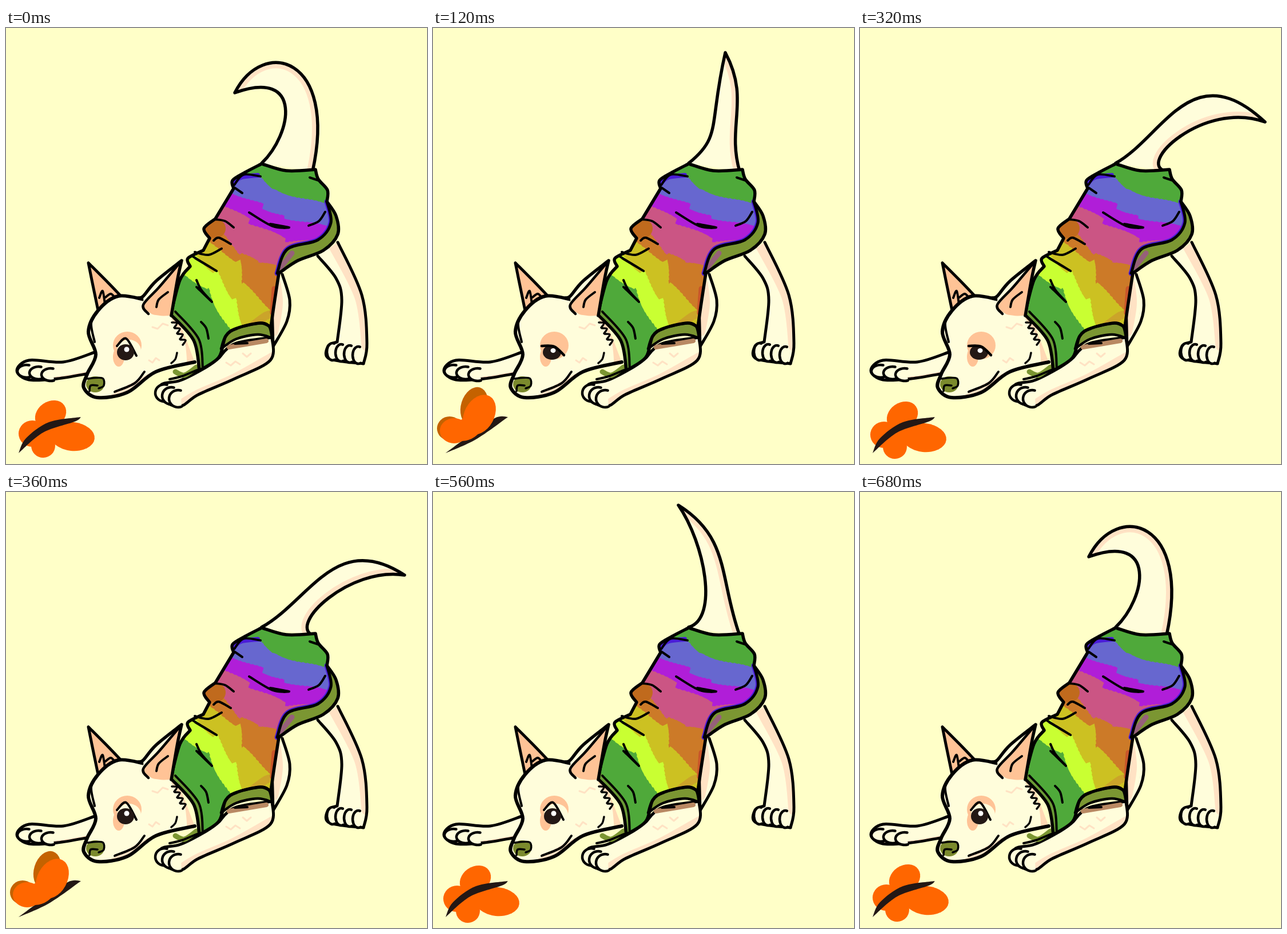
An HTML page with a canvas for the animation above (0.72 s loop, 736 by 761 pixels).

```html
<!DOCTYPE html>
<html lang="en">
<head>
<meta charset="utf-8">
<title>Playful puppy</title>
<style>
html, body { margin: 0; width: 100%; height: 100%; overflow: hidden; background: #ffffc8; }
canvas { display: block; }
</style>
</head>
<body>
<canvas id="stage" width="736" height="761"></canvas>
<script>
const ctx = document.getElementById('stage').getContext('2d');
const STEP = 40, STEPS = 18;
const CREAM = '#fffddb', PEACH = '#ffe2c4', SKIN = '#ffc396', GREEN = '#4fa93a', OLIVE = '#7b9632';
const ORANGE = '#ff6600', DARK = '#231815';

const points = s => s.trim().split(/\s+/).map(p => p.split(',').map(Number));

// Smooth curve through key points; "|" marks a corner
function shape(text) {
  const path = new Path2D();
  let last = null;
  for (const part of text.split('|')) {
    const p = last ? [last, ...points(part)] : points(part);
    if (!last) path.moveTo(...p[0]);
    for (let i = 0; i < p.length - 1; i++) {
      const a = p[i - 1] || p[i], b = p[i], c = p[i + 1], d = p[i + 2] || c;
      path.bezierCurveTo(
        b[0] + (c[0] - a[0]) / 6, b[1] + (c[1] - a[1]) / 6,
        c[0] - (d[0] - b[0]) / 6, c[1] - (d[1] - b[1]) / 6, c[0], c[1]);
    }
    last = p[p.length - 1];
  }
  return path;
}

const toPath = s => typeof s === 'string' ? shape(s) : s;

function fill(s, color) {
  ctx.fillStyle = color;
  ctx.fill(toPath(s));
}

function ink(s, width = 5, color = '#000') {
  ctx.lineWidth = width;
  ctx.strokeStyle = color;
  ctx.stroke(toPath(s));
}

function inside(path, paint) {
  ctx.save();
  ctx.clip(path);
  paint();
  ctx.restore();
}

// Filled outline with a soft shadow along one edge
function limb(outline, shade, size) {
  const path = shape(outline);
  fill(path, CREAM);
  inside(path, () => ink(shade, size, PEACH));
  ink(path);
}

function oval(x, y, rx, ry, color, turn = 0) {
  ctx.fillStyle = color;
  ctx.beginPath();
  ctx.ellipse(x, y, rx, ry, turn, 0, 7);
  ctx.fill();
}

function toes(count, x, y, dx, dy, rx, ry) {
  for (let i = 0; i < count; i++) {
    const path = new Path2D();
    path.ellipse(x + i * dx, y + i * dy, rx, ry, 0, 5, 1.2, true);
    fill(path, CREAM);
    ink(path, 4.5);
  }
}

function zigzag(count, x, y, dx, dy, color) {
  const path = new Path2D();
  for (let i = 0; i < count; i++) path.lineTo(x + i * dx, y + i * dy + (i % 2 ? 6 : 0));
  ink(path, 3, color);
}

// Tail pose: two handles for the left edge, the tip, two handles for the right edge
const [CURL, LEAN, UP, OUT, LOW] = [
  '500,185 520,70 400,113 450,15 580,50',
  '500,220 475,90 429,23 520,80 500,150',
  '505,190 482,170 511,43 555,125 513,170',
  '530,190 570,110 674,107 600,140 520,215',
  '530,190 580,45 708,164 600,125 480,240'
].map(points);
const SWING = [[0, CURL], [2, LEAN], [3, UP], [5, OUT], [8, LOW]];

function tail(step) {
  const at = step < 9 ? step : Math.max(0, 16 - step);
  const k = Math.max(1, SWING.findIndex(s => s[0] >= at));
  const [s0, from] = SWING[k - 1], [s1, to] = SWING[k];
  const f = (at - s0) / (s1 - s0);
  const [a, b, tip, c, d] = from.map((p, i) => p.map((v, n) => v + (to[i][n] - v) * f));
  const path = new Path2D(), edge = new Path2D();
  path.moveTo(447, 236);
  path.bezierCurveTo(...a, ...b, ...tip);
  path.bezierCurveTo(...c, ...d, 536, 250);
  edge.moveTo(...tip);
  edge.bezierCurveTo(...c, ...d, 536, 250);
  fill(path, CREAM);
  inside(path, () => ink(edge, 20, PEACH));
  ink(path, 5.5);
}

function legs() {
  limb('483,430 496,475 491,512 467,556 | 465,480', '470,430 476,480 468,530', 16);
  limb('545,398 577,437 587,475 579,548 | 563,555 565,577 625,586 | 631,550 622,466 580,374',
    '572,380 618,470 630,555', 17);
  toes(4, 571, 565, 15, 2, 10, 15);
  limb('155,566 100,583 40,580 19,598 40,614 90,612 145,603', '40,614 90,612 145,603', 8);
  toes(3, 36, 599, 21, 3, 16, 11);
  limb('465,540 462,580 400,612 336,640 302,661 264,645 | 272,622 305,615 350,592 372,576 | 400,551 465,540',
    '466,575 400,612 336,640 302,661', 18);
  ink('390,557 455,546', 8, '#b98963');
  ink('400,551 422,550', 4);
  zigzag(4, 385, 584, 8, -1, PEACH);
  zigzag(3, 414, 568, 7, 0, PEACH);
  toes(3, 277, 637, 12, 5, 16, 15);
}

function head(step) {
  const ear = shape('201,468 178,444 144,410 | 150,440 161,493');
  fill(ear, SKIN);
  ink(ear);
  ink('163,471 169,459 173,482', 4);
  ink('174,470 183,464 190,470', 4);

  const profile = '242,474 196,468 161,493 144,530 157,570 142,604 136,628 160,645 212,636 262,600 330,583';
  const face = shape(profile + ' | 300,505');
  fill(face, CREAM);
  inside(face, () => {
    ink('300,505 322,540 328,590', 22, '#ffd9b4');
    ink('185,645 242,612 285,594', 9, PEACH);
  });
  zigzag(4, 250, 580, 6, -2, PEACH);
  zigzag(4, 256, 522, 9, -3, PEACH);
  ink('296,600 312,606 333,592', 9, OLIVE);
  ink('286,613 307,608 334,597', 4);
  ink(profile, 6);
  ink('161,493 149,515 155,548', 4);
  ink('242,600 225,620 190,635', 4);
  for (let i = 0; i < 4; i++) {
    const x = 290 + i * 5, y = 514 + i * 10;
    ink(`${x},${y} ${x + 9},${y + 1} ${x + 4},${y + 9}`, 3.5);
  }
  ink('299,567 296,578 289,585', 3.5);

  oval(156, 622, 16, 14, '#7b8a2d');
  ink('142,612 168,611 171,624 162,629', 3.5);
  ink('146,634 148,624 160,624', 3.5);
  eye(step);
}

function eye(step) {
  const lid = Math.abs(step - 5);
  oval(212, 554, 25, 24, SKIN);
  oval(197, 574, 10, 17, SKIN);
  if (lid < 2) return ink('193,566 208,563 225,573', 4.5);
  if (lid < 4) {
    const brow = '190,555 212,556 229,571';
    inside(shape(brow + ' | 225,590 | 190,590'), () => {
      oval(208, 566, 16, 13, DARK);
      oval(210, 563, 4.5, 4, '#fff');
    });
    return ink(brow, 4.5);
  }
  oval(215, 563, 21, 19, CREAM);
  ink('194,555 210,542 228,572', 4);
  oval(209, 566, 15, 14, DARK);
  oval(211, 561, 4.5, 4.5, '#fff');
}

function rightEar() {
  const ear = shape('289,502 300,438 307,406 | 262,442 240,468 | 243,490 262,503');
  const fold = '307,406 268,452 240,483 249,499';
  fill(ear, CREAM);
  inside(ear, () => fill(fold + ' | 289,505', SKIN));
  ink('289,502 300,438 307,406 | 262,442 240,468 231,471', 5.5);
  ink(fold, 4.5);
  ink('263,487 267,474 283,461', 4);
}

// Dye stripes: colour and ragged upper edge, painted from top to bottom
const DYE = [
  ['#6767cf', '390,252 443,254 470,278 575,318'],
  ['#b01ed8', '385,278 450,311 488,328 585,358'],
  ['#cb5584', '370,300 425,338 488,372 560,378'],
  ['#cc7a28', '340,328 412,394 440,412 490,422'],
  ['#ccc122', '330,365 405,405 412,448 480,500'],
  ['#c9ff32', '310,378 366,425 400,472 420,525'],
  [GREEN, '300,422 355,453 392,530']
];

function stripe(color, text, seed) {
  const p = points(text);
  ctx.fillStyle = color;
  ctx.beginPath();
  for (let i = 0; i < p.length - 1; i++) {
    const [x, y] = p[i], dx = p[i + 1][0] - x, dy = p[i + 1][1] - y, len = Math.hypot(dx, dy);
    const count = Math.ceil(len / 8);
    for (let j = 0; j < count; j++) {
      const off = 5 * Math.sin((i * 20 + j) * 12.9 + seed * 7.3);
      for (const f of [j / count, (j + 0.8) / count]) {
        ctx.lineTo(x + dx * f - dy / len * off, y + dy * f + dx / len * off);
      }
    }
  }
  ctx.lineTo(700, p[p.length - 1][1]);
  ctx.lineTo(700, 700);
  ctx.lineTo(200, 700);
  ctx.fill();
}

const SHIRT = shape('447,237 490,249 541,247 | 546,264 562,283 561,303 | 577,328 580,360 555,388 510,406 477,428 | 469,480 463,522 | 445,515 404,524 384,538 372,575 338,598 | 328,545 288,500 | 304,440 322,416 | 318,402 345,388 | 356,367 | 346,350 366,333 | 398,280 | 396,266 418,252 447,237');
const HEM = '561,303 568,340 545,370 492,386 474,428';
const FOLDS = [
  '425,322 466,346 495,348 462,342', '529,345 547,337 558,321', '399,274 415,256 445,259',
  '400,279 413,288', '366,334 383,337 398,348', '363,371 372,366 393,377', '330,391 354,396 377,385',
  '327,399 345,410 368,424 331,402', '333,440 342,458 360,478 333,452', '341,513 350,524 354,542', '531,261 546,266'
];

function shirt() {
  fill(SHIRT, GREEN);
  inside(SHIRT, () => {
    DYE.forEach(([color, edge], i) => stripe(color, edge, i));
    ink('425,524 455,502 470,500', 14, '#cba42a');
    ink('469,455 466,497', 9, '#c9552a');
    ink('398,272 410,261 440,257', 8, '#4a1cd8');
    oval(366, 350, 18, 17, '#c06a1d');
    ink(HEM, 9, '#4a1cd8');
    fill(HEM + ' | 600,430 | 600,300', OLIVE);
    ink('480,418 500,393', 9, '#96607a');
    ink('290,496 333,545 338,600', 13, '#6a9a35');
  });

  const cuff = shape('376,560 384,538 404,524 445,515 460,521 465,541 | 440,535 402,543 376,560');
  fill(cuff, OLIVE);
  ink(cuff, 4.5);
  ink(SHIRT, 5.5);
  ink(HEM, 5);
  ink('296,495 337,543 344,594', 4);
  for (const f of FOLDS) ink(f, 4);
}

function butterfly(step) {
  if (step % 2 && step < STEPS - 1) {
    oval(72, 660, 23, 34, '#c46200', 0.3);
    oval(29, 699, 22, 21, '#c46200');
    fill('22,742 60,714 108,681 131,679 | 75,718 22,742', DARK);
    oval(81, 675, 26, 37, ORANGE, 0.5);
    oval(37, 703, 25, 22, ORANGE);
    oval(62, 698, 29, 19, ORANGE, -0.6);
    return;
  }
  const still = step % (STEPS - 1) === 0;
  ctx.save();
  if (!still) ctx.translate(-4, 2);
  oval(78, 675, 29, 23, ORANGE, -0.6);
  oval(46, 708, 24, 23, ORANGE);
  oval(116, 713, 39, 25, ORANGE, 0.1);
  oval(65, 729, 21, 21, ORANGE, -0.4);
  oval(75, 702, 22, 14, ORANGE, -0.5);
  ctx.restore();
  fill('22,742 35,716 75,688 131,679 | 120,687 65,706 22,742', DARK);
}

function draw(step) {
  ctx.fillStyle = '#ffffc8';
  ctx.fillRect(0, 0, 736, 761);
  ctx.lineCap = ctx.lineJoin = 'round';
  tail(step);
  legs();
  head(step);
  shirt();
  rightEar();
  butterfly(step);
}

const start = performance.now();
let shown = -1;
function tick() {
  const step = Math.floor((performance.now() - start) / STEP) % STEPS;
  if (step !== shown) draw(shown = step);
  requestAnimationFrame(tick);
}
tick();
</script>
</body>
</html>
```
